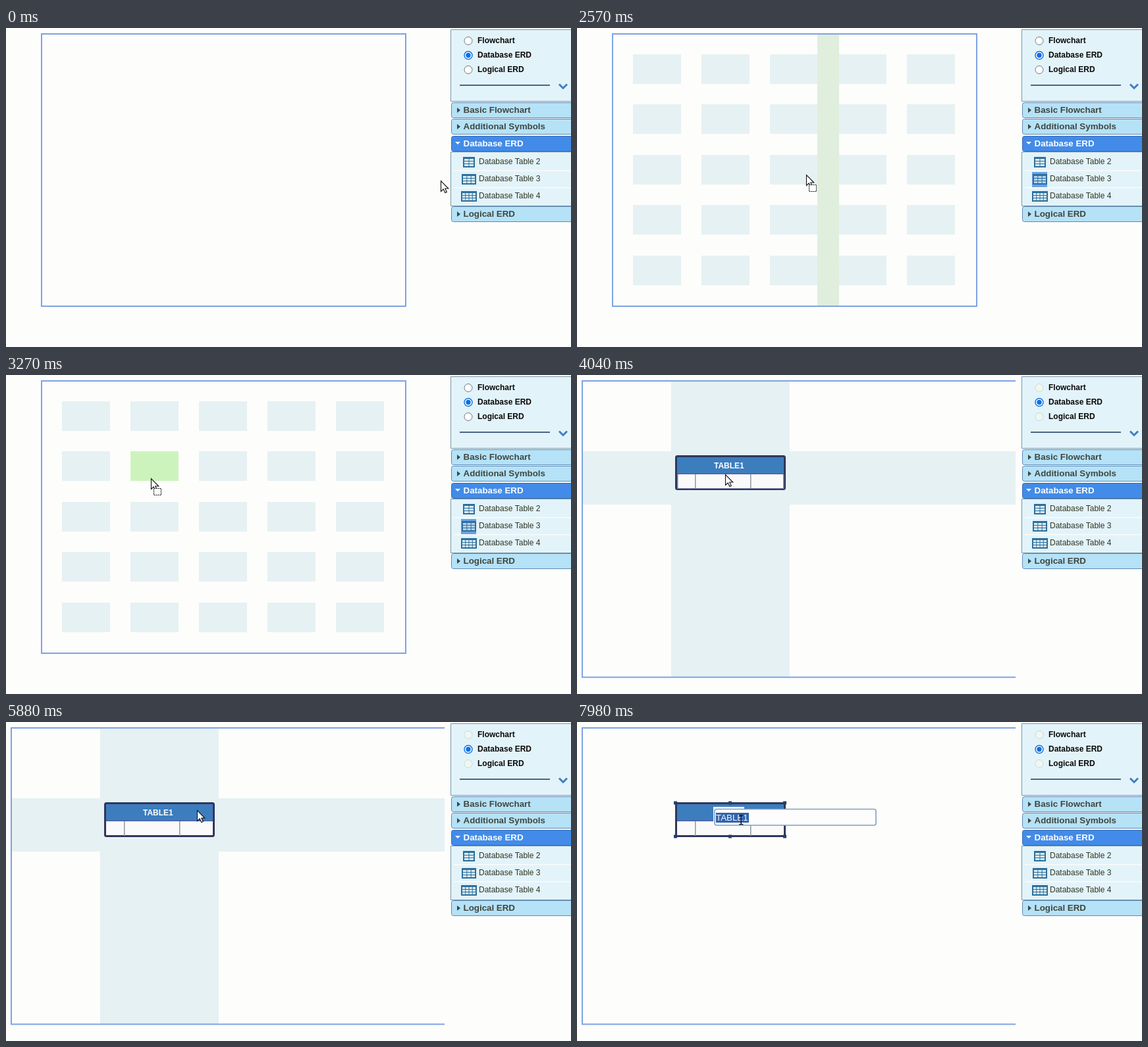
Recreate the animation shown at these times as an HTML page with a canvas. Size 858x485 px, loop 8000 ms.

```html
<!DOCTYPE html>
<html lang="en">
<head>
<meta charset="utf-8">
<title>Table diagram editor</title>
<style>
html, body { margin: 0; width: 100%; height: 100%; overflow: hidden; background: #fdfdfc; }
canvas { display: block; width: 100vw; height: 100vh; }
</style>
</head>
<body>
<canvas id="stage" width="858" height="485"></canvas>
<script>
const ctx = document.getElementById('stage').getContext('2d');
const LOOP = 8000;
const DRAG = 1950, DROP = 3410, SELECT = 6480, LEAVE = 6900, EDIT = 7560;
const HOVER_LAG = 60;
const PAPER = '#fdfdfc', BAND = '#e6f1f3', GAP = '#dfeedd', PANEL = '#e3f3fa', FRAME = '#7ea3e3';

// Pointer path: time, x, y
const path = [
  [0, 660, 232], [500, 660, 232], [1150, 700, 253], [1600, 703, 246],
  [1800, 705, 230], [1950, 704, 230], [2200, 608, 229], [2500, 390, 224],
  [2570, 348, 223], [2850, 248, 178], [3150, 220, 157], [3500, 220, 157],
  [3900, 225, 151], [5150, 225, 151], [5720, 290, 134], [6700, 290, 134],
  [7250, 249, 141], [8000, 249, 141]
];

function pointerAt(t) {
  const i = Math.max(1, path.findIndex(p => p[0] > t));
  const [t0, x0, y0] = path[i - 1], [t1, x1, y1] = path[i];
  const k = (t - t0) / (t1 - t0);
  return { x: x0 + (x1 - x0) * k, y: y0 + (y1 - y0) * k };
}

function fill(color, x, y, w, h) {
  ctx.fillStyle = color;
  ctx.fillRect(x, y, w, h);
}

function box(x, y, w, h, radius, fillColor, strokeColor, line = 1) {
  ctx.beginPath();
  ctx.roundRect(x, y, w, h, radius);
  ctx.fillStyle = fillColor;
  ctx.fill();
  ctx.strokeStyle = strokeColor;
  ctx.lineWidth = line;
  ctx.stroke();
}

function text(string, x, y, size, color, weight = 'normal') {
  ctx.font = `${weight} ${size}px "Liberation Sans", Arial, sans-serif`;
  ctx.fillStyle = color;
  ctx.fillText(string, x, y);
}

function shape(points, fillColor) {
  ctx.beginPath();
  points.forEach(([x, y]) => ctx.lineTo(x, y));
  ctx.closePath();
  ctx.fillStyle = fillColor;
  ctx.fill();
}

function radio(y, label, checked, faded) {
  ctx.beginPath();
  ctx.arc(702, y, 6, 0, 7);
  ctx.fillStyle = faded ? '#eef7f4' : '#fff';
  ctx.fill();
  ctx.strokeStyle = checked ? '#1673dc' : faded ? '#c8dccb' : '#6d7880';
  ctx.lineWidth = checked ? 1.5 : 1;
  ctx.stroke();
  if (checked) {
    ctx.beginPath();
    ctx.arc(702, y, 3.7, 0, 7);
    ctx.fillStyle = '#0870e8';
    ctx.fill();
  }
  text(label, 716, y + 3.5, 12, '#080808', 'bold');
}

function heading(y, label, open) {
  box(676.5, y + .5, 200, 23, 3, open ? '#428be8' : '#b5e2f7', open ? '#386bb8' : '#5f88b4');
  const color = open ? '#fff' : '#40463f';
  shape(open ? [[682, y + 9], [690, y + 9], [686, y + 13]]
             : [[685, y + 8], [690, y + 12], [685, y + 16]], color);
  text(label, 694.5, y + 16, 13.33, color, 'bold');
}

function tableIcon(cols, y, hovered) {
  const w = Math.min(24, 10 + cols * 4), x = 703 - w / 2;
  if (hovered) fill('#6c9fe8', 691, y - 3, 23, 23);
  fill('#2c709d', x, y, w, 16);
  const step = (w - 3) / cols;
  for (let c = 0; c < cols; c++)
    for (let r = 0; r < 3; r++)
      fill(hovered ? '#b5d3ec' : '#dcedf2', x + 2 + c * step, y + 3 + r * 4, step - 1, 3);
}

function panel(t, pointer) {
  box(675.5, 2.5, 200, 109, 0, PANEL, '#7697a6');
  const faded = t >= DROP;
  radio(19.5, 'Flowchart', false, faded);
  radio(41.5, 'Database ERD', true);
  radio(63.5, 'Logical ERD', false, faded);
  fill('#4a6680', 689, 86, 137, 2);
  ctx.beginPath();
  ctx.moveTo(840, 85.5);
  ctx.lineTo(846, 91.5);
  ctx.lineTo(852, 85.5);
  ctx.strokeStyle = '#3f7fc4';
  ctx.lineWidth = 3;
  ctx.stroke();

  box(675.5, 188.5, 200, 82, 0, PANEL, '#7697a0');
  heading(113, 'Basic Flowchart');
  heading(138, 'Additional Symbols');
  heading(164, 'Database ERD', true);
  heading(271, 'Logical ERD');
  const dragging = t >= DRAG && t < DROP;
  for (let i = 0; i < 3; i++) {
    const y = 196 + i * 26;
    const over = pointer.x >= 691 && pointer.x < 715 && pointer.y >= y - 4 && pointer.y < y + 22;
    if (i) fill('#fafcfc', 680, y - 6, 178, 1.5);
    tableIcon(i + 2, y, dragging ? i === 1 : over);
    text(`Database Table ${i + 2}`, 718, y + 11, 12, '#303522');
  }
}

function dropGrid(target) {
  const inside = target.x > 54 && target.x < 606;
  const col = Math.floor((target.x - 54) / 104), row = Math.floor((target.y - 9) / 76.5);
  const inCol = target.x - col * 104 >= 85, inRow = target.y - row * 76.5 >= 40;
  for (let c = 0; c < 5; c++)
    for (let r = 0; r < 5; r++) {
      const active = inside && inCol && inRow && c === col && r === row;
      fill(active ? '#cdf3bd' : BAND, 85 + c * 104, Math.round(39.7 + r * 76.5), 73, 45);
    }
  if (!inside) return;
  if (!inCol) fill(GAP, 53 + col * 104, 10, 33, 412);
  else if (!inRow) fill(GAP, 55, 8 + row * 76.5, 551, 33);
}

function emptyCanvas(t) {
  if (t >= DRAG) dropGrid(pointerAt(t - HOVER_LAG));
  ctx.strokeStyle = FRAME;
  ctx.lineWidth = 2;
  ctx.strokeRect(54, 9, 553, 414);
}

function tableCanvas(t, pointer) {
  if (t < LEAVE) {
    fill(BAND, 143, 10, 180, 449);
    fill(BAND, 9, 116, 657, 81);
  }
  fill(FRAME, 7, 8, 659, 2);
  fill(FRAME, 7, 8, 2, 452);
  fill(FRAME, 7, 458.5, 659, 2);

  const selected = t >= SELECT, editing = t >= EDIT;
  box(150.5, 123.5, 165, 50, selected ? 0 : 2, '#fafafa', '#30375c', 3);
  fill('#3c7dbe', 152, 125, 162, 25);
  fill('#5660a6', 152, 149.5, 162, 1.5);
  fill('#8f98a0', 179, 151, 1.5, 22);
  fill('#8f98a0', 263, 151, 1.5, 22);
  if (!selected && pointer.y > 150) {
    fill('#7c80a8', 152, 151, 1.5, 22);
    fill('#7c80a8', 313, 151, 1.5, 22);
    fill('#7c80a8', 152, 172, 162, 1);
  }
  if (selected)
    for (const x of [150, 233, 316])
      for (const y of [123, 174]) fill('#243f66', x - 3, y - 2.5, 5, 5);

  if (!editing) {
    text('TABLE1', 208, 142, 12, '#fff', 'bold');
    return;
  }
  fill('#fafcff', 207, 129, 47, 28);
  box(209, 132.5, 245, 24.5, 3, '#fdfdfd', '#839fbd', 1.6);
  fill('#3265ad', 211, 138, 50, 15);
  text('TABLE1', 211, 150, 13.33, '#f4f8ff');
}

function pointerShape({ x, y }, t) {
  if (t >= EDIT) {
    fill('#10151b', 248.5, 142, 1.5, 13);
    for (const py of [141, 155]) fill('#10151b', 246, py, 6.5, 1.3);
    return;
  }
  ctx.save();
  ctx.translate(Math.round(x) + .5, Math.round(y) + .5);
  shape([[0, 0], [0, 16], [3.7, 12.5], [6.3, 18], [8.8, 17], [6.3, 11.5], [11.3, 11.5]], '#fff');
  ctx.strokeStyle = '#111';
  ctx.lineWidth = 1.1;
  ctx.stroke();
  if (t >= DRAG && t < DROP) {
    fill('#fff', 4, 15, 11, 10);
    ctx.setLineDash([2, 1]);
    ctx.strokeRect(4, 15, 11, 10);
  }
  ctx.restore();
}

function draw(t) {
  const pointer = pointerAt(t);
  fill(PAPER, 0, 0, 858, 485);
  if (t < DROP) emptyCanvas(t);
  else tableCanvas(t, pointer);
  panel(t, pointer);
  pointerShape(pointer, t);
}

const start = performance.now();
function frame() {
  draw((performance.now() - start) % LOOP);
  requestAnimationFrame(frame);
}
frame();
</script>
</body>
</html>
```
